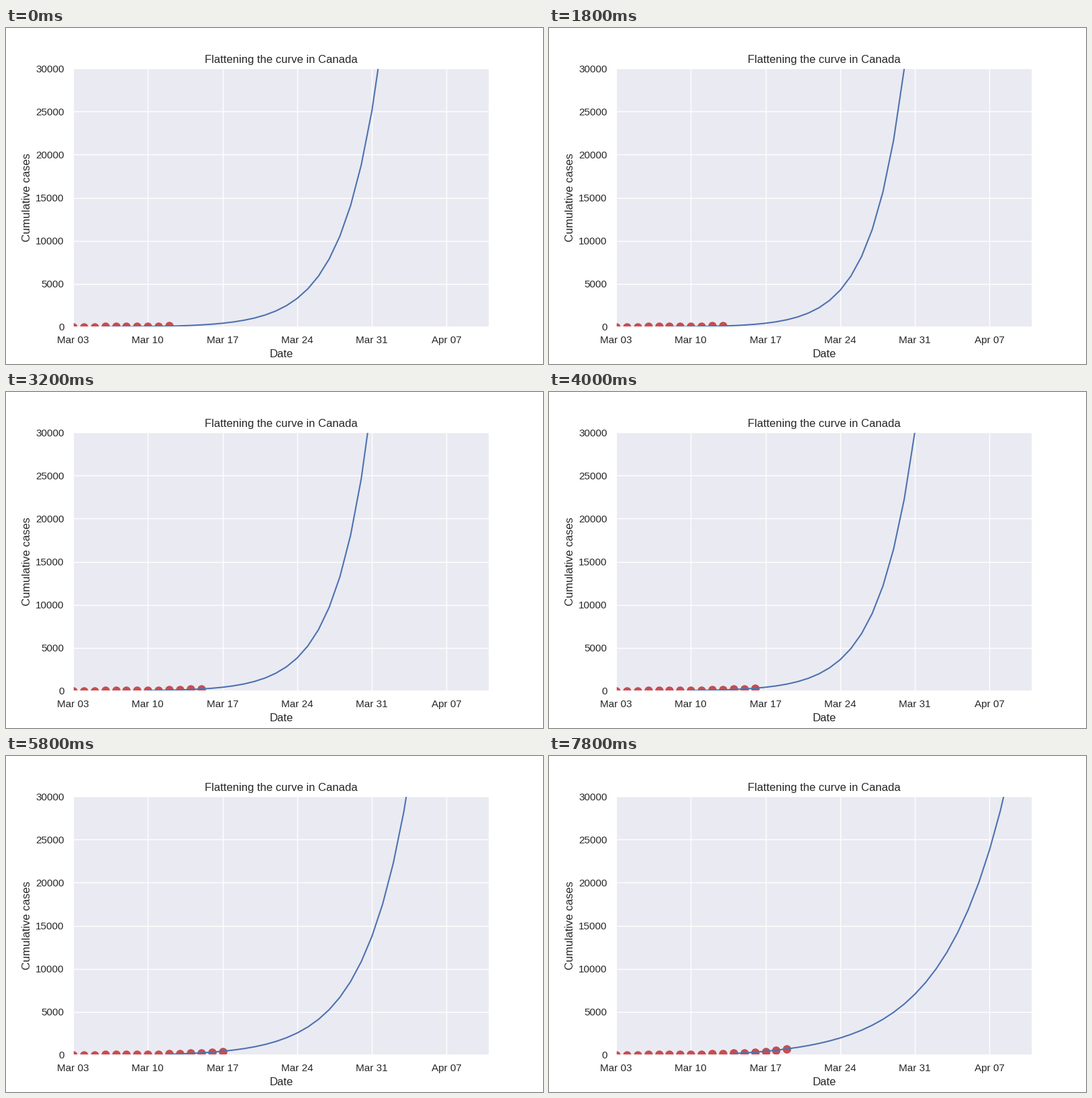
Recreate the animation shown at these times as a matplotlib script. Size 800 by 500 pixels, loop 8000 ms.

```python
import math

import numpy as np
import matplotlib.pyplot as plt
from matplotlib.animation import FuncAnimation

STEPS = 5          # frames per day of new data
FRAMES = 40
FIRST = 10         # points shown at the start
TOP = 30000
INK = "0.15"

# Every fit passes through about the same point on Mar 17
PIVOT_DAY, PIVOT = 14, 440
# Day on which each successive fit reaches the top of the plot
reach = [28.62, 26.69, 27.09, 27.56, 27.99, 29.54, 31.95, 34.90, 36.82]

plt.rcParams.update({
    "font.family": "Liberation Sans",
    "text.color": INK,
    "axes.labelcolor": INK,
    "xtick.color": INK,
    "ytick.color": INK,
})


def cases(days):
    return 18 + 12 * np.exp(days / 4)


def fit(k, days):
    """Exponential with an offset that grows as the curve flattens."""
    low = -85 * max(0, k - 5)
    rate = math.log((TOP - low) / (PIVOT - low)) / (reach[k] - PIVOT_DAY)
    return low + (PIVOT - low) * np.exp(rate * (days - PIVOT_DAY))


fig = plt.figure(figsize=(8, 5), dpi=100, facecolor="white")
ax = fig.add_axes([0.125, 0.11, 0.775, 0.77], facecolor="#EAEAF2")
ax.set_xlim(0, 39)
ax.set_ylim(0, TOP)
ax.set_xticks(range(0, 39, 7),
              ["Mar 03", "Mar 10", "Mar 17", "Mar 24", "Mar 31", "Apr 07"])
ax.set_yticks(range(0, TOP + 1, 5000))
ax.set_axisbelow(True)
ax.grid(color="white", linewidth=1)
# Invisible ticks keep the labels at their distance
ax.tick_params(length=6, width=0, pad=3.5, labelsize=11)
for spine in ax.spines.values():
    spine.set(color="white", linewidth=1.25)
ax.set_title("Flattening the curve in Canada", fontsize=12, pad=6)
ax.set_xlabel("Date", fontsize=12)
ax.set_ylabel("Cumulative cases", fontsize=12)

dots, = ax.plot([], [], "o", color="#C44E52", markersize=8, markeredgewidth=1)
line, = ax.plot([], [], color="#4C72B0", linewidth=1.5)


def draw(frame):
    k, step = divmod(frame, STEPS)
    t = step / STEPS
    seen = np.arange(FIRST + k)
    dots.set_data(seen, cases(seen))
    # Blend two fits over the days that both of them cover
    days = np.arange(3 + math.ceil(k + t), 40)
    line.set_data(days, (1 - t) * fit(k, days) + t * fit(k + 1, days))
    return dots, line


anim = FuncAnimation(fig, draw, frames=FRAMES, init_func=lambda: draw(0),
                     interval=1000 / STEPS, repeat=True, repeat_delay=0)
plt.show()
```
